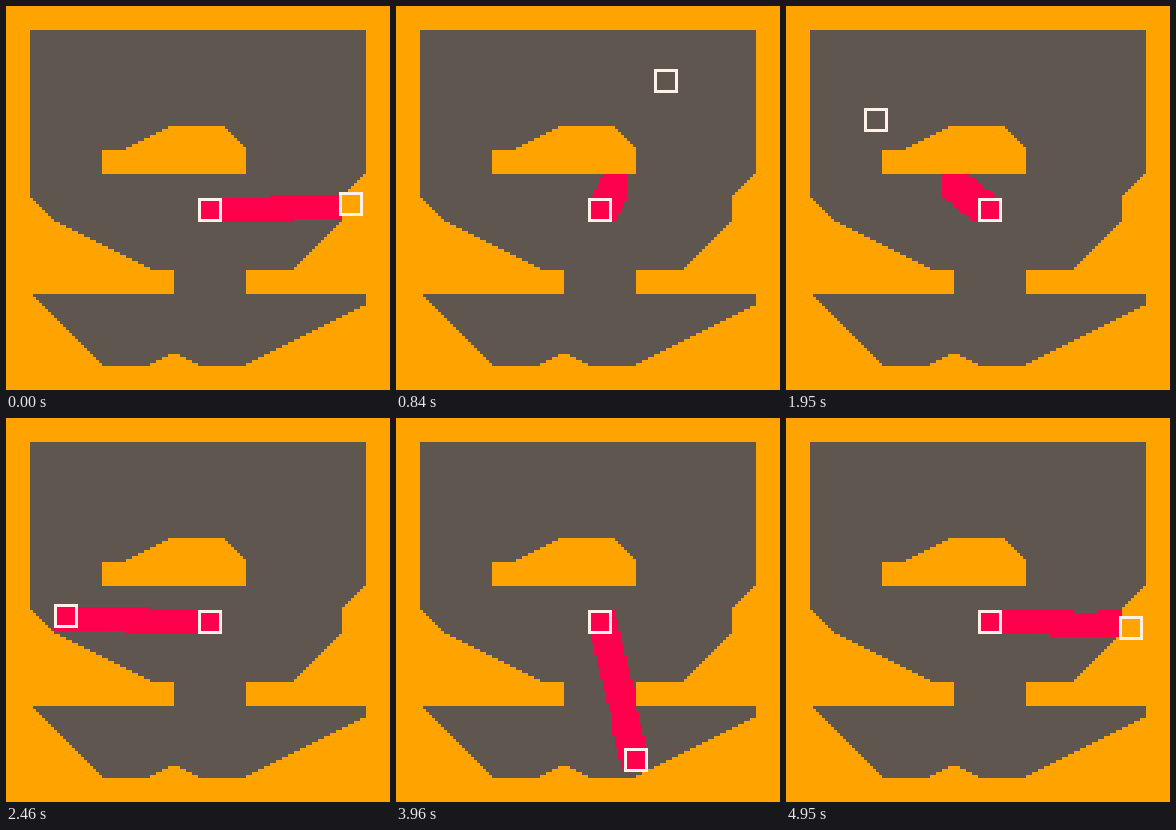
These frames come from a looping animation (384x384 px, 4980 ms). An HTML page with a canvas:

```html
<!DOCTYPE html>
<html>
<head>
<meta charset="utf-8">
<style>
html, body { margin: 0; width: 100%; height: 100%; overflow: hidden; background: #ffa300; }
canvas { display: block; width: 384px; height: 384px; image-rendering: pixelated; }
</style>
</head>
<body>
<canvas id="stage" width="128" height="128"></canvas>
<script>
const ctx = document.getElementById('stage').getContext('2d');
const SIZE = 128, BOX = 8, START = 64, RADIUS = 48;
const STEP_MS = 30, LOOP_MS = 4980;
const half = n => Math.floor(n / 2);

// Each profile gives the first solid row in column x.
function upperFloor(x) {
  if (x < 16) return 56 + x;
  if (x < 48) return 72 + half(x - 16);
  if (x < 56) return 88;
  if (x < 80) return 96;
  if (x < 96) return 88;
  if (x < 112) return 183 - x;
  return 175 - x;
}

function lowerFloor(x) {
  if (x < 32) return 88 + x;
  if (x < 48) return 120;
  if (x < 56) return 119 - half(x - 48);
  if (x < 64) return 116 + half(x - 56);
  if (x < 80) return 120;
  return 119 - half(x - 80);
}

function ledgeTop(x) {
  if (x < 32 || x >= 80) return 56;
  if (x < 40) return 48;
  if (x < 56) return 47 - half(x - 40);
  return x < 72 ? 40 : x - 32;
}

function solid(x, y) {
  if (x < 8 || x >= 120 || y < 8) return true;
  if (y < 96) return y >= upperFloor(x) || (y >= ledgeTop(x) && y < 56);
  return y >= lowerFloor(x);
}

const grid = Array.from({ length: SIZE }, (_, y) =>
  Array.from({ length: SIZE }, (_, x) => solid(x, y)));

function blocked(x, y) {
  for (let j = y; j < y + BOX; j++)
    for (let i = x; i < x + BOX; i++)
      if (grid[j][i]) return true;
  return false;
}

// Sweep the box towards the goal one pixel per axis, climbing slopes.
function sweep(goalX, goalY, visit) {
  const dx = goalX - START, dy = goalY - START;
  const sx = Math.sign(dx), sy = Math.sign(dy);
  const nx = Math.abs(dx), ny = Math.abs(dy);
  let x = START, y = START, i = 0, j = 0;
  visit(x, y);
  for (;;) {
    const timeX = i < nx ? i / nx : 1;
    const timeY = j < ny ? (j + 1) / ny : 1;
    if (Math.min(timeX, timeY) >= 1) return;
    if (timeX < timeY) {
      i++;
      if (!blocked(x + sx, y)) x += sx;
      else if (!blocked(x + sx, y - 1)) { x += sx; y--; }
    } else {
      j++;
      if (!blocked(x, y + sy)) y += sy;
      else if (sy < 0) return;
    }
    visit(x, y);
  }
}

const field = document.createElement('canvas');
field.width = field.height = SIZE;
const fieldCtx = field.getContext('2d');
for (let y = 0; y < SIZE; y++)
  for (let x = 0; x < SIZE; x++) {
    fieldCtx.fillStyle = grid[y][x] ? '#ffa300' : '#5f574f';
    fieldCtx.fillRect(x, y, 1, 1);
  }

function outline(x, y) {
  ctx.strokeStyle = '#fff1e8';
  ctx.lineWidth = 1;
  ctx.strokeRect(x + 0.5, y + 0.5, BOX - 1, BOX - 1);
}

function draw(step) {
  // Fixed-point turn: a little under one full circle per loop.
  const angle = (248 + 392 * step) / 65536 * 2 * Math.PI;
  const goalX = Math.floor(START + RADIUS * Math.cos(angle));
  const goalY = Math.floor(START - RADIUS * Math.sin(angle));
  ctx.drawImage(field, 0, 0);
  ctx.fillStyle = '#ff004d';
  sweep(goalX, goalY, (x, y) => ctx.fillRect(x, y, BOX, BOX));
  outline(START, START);
  outline(goalX, goalY);
}

const begin = performance.now();
function tick() {
  const t = (performance.now() - begin) % LOOP_MS;
  draw(Math.floor(t / STEP_MS));
  requestAnimationFrame(tick);
}
tick();
</script>
</body>
</html>
```
